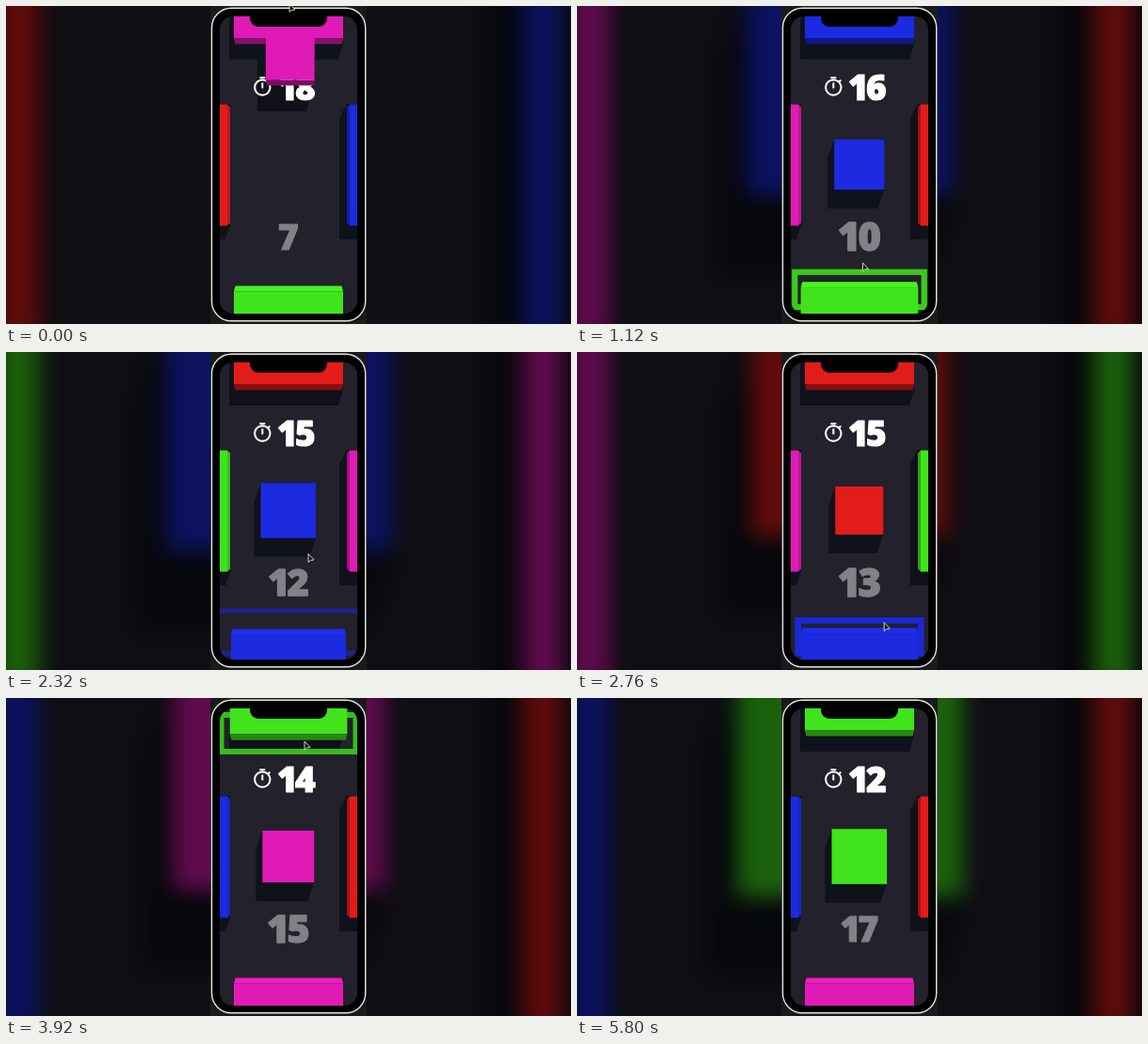
Animation, 600 px wide and 338 px high, one loop 6000 ms. Source, as an HTML page with a canvas:

```html
<!DOCTYPE html>
<html lang="en">
<head>
<meta charset="utf-8">
<title>Colour swipe game</title>
<style>
  html, body { margin: 0; width: 100%; height: 100%; overflow: hidden; background: #0b0b10; }
  canvas { display: block; width: 100vw; height: 100vh; }
</style>
</head>
<body>
<canvas id="stage" width="600" height="338"></canvas>
<script>
const LOOP = 6000, STEP = 40, FLIGHT = 130, SWIPE = 220;
const stage = document.getElementById('stage').getContext('2d');
const layer = document.createElement('canvas');
layer.width = 600;
layer.height = 338;
const scene = layer.getContext('2d');

const COLORS = { M: [224, 26, 180], R: [226, 27, 27], B: [28, 42, 224], G: [64, 227, 28] };
const FONT = '900 semi-condensed 37px "Open Sans", "Noto Sans", sans-serif';

// Wall colours run clockwise from the top; a shuffle lasts until the next one.
const SHUFFLES = { 0: 'MBGR', 2: 'BRGM', 4: 'RMBG', 6: 'RGBM', 7: 'GRMB' };
const CUBES = 'MGGBBBRGMMG';
const FACE_LIGHT = [0.6, 0.72, 1.08, 0.86];

// Every cube strikes the wall of its own colour; the pace slows after the third hit.
let walls;
const hits = [...CUBES].map((cube, i) => {
  const turn = walls ? walls.indexOf(CUBES[i - 1]) : -1;
  walls = SHUFFLES[i] || walls;
  return { time: 900 + (i - 3) * (i < 3 ? 430 : 556), turn, walls, cube };
});

const clamp = v => Math.max(0, Math.min(1, v));
const mix = (a, b, p) => a + (b - a) * p;
const smooth = v => clamp(v) ** 2 * (3 - 2 * clamp(v));
const shade = (key, k = 1) => `rgb(${COLORS[key].map(v => Math.min(255, v * k)).join(',')})`;

function poly(ctx, fill, ...points) {
  ctx.beginPath();
  points.forEach(p => ctx.lineTo(...p));
  ctx.closePath();
  ctx.fillStyle = fill;
  ctx.fill();
}

function rounded(ctx, x, y, w, h, r) {
  ctx.beginPath();
  ctx.roundRect(x, y, w, h, r);
}

function shadow(x, y, w, h, dx, dy) {
  poly(scene, '#0f111b', [x, y], [x + dx, y + dy], [x + dx, y + h + dy],
    [x + w + dx, y + h + dy], [x + w, y + h], [x + w, y]);
}

// Local axes of a wall: x along the screen edge, y pointing into the screen.
function atEdge(turn, draw) {
  const angle = turn * Math.PI / 2;
  scene.save();
  scene.translate(300 + 73 * Math.sin(angle), 169 - 158 * Math.cos(angle));
  scene.rotate(angle);
  draw();
  scene.restore();
}

function drawWall(turn, color, bump) {
  const upright = turn % 2;
  const half = upright ? 64.5 : 58, depth = upright ? 8 : 23.5, face = upright ? 3 : 6;
  const inset = upright ? 3 : 1.5;
  atEdge(turn, () => {
    const k = 1 + 0.075 * bump;
    scene.translate(0, 27 * (1 - k) * -1 - 27 * 0 - 54 * (k - 1));
    scene.translate(0, 54 * (k - 1));
    scene.scale(k, k);
    poly(scene, shade(color), [-half, -30], [half, -30], [half, depth], [-half, depth]);
    poly(scene, shade(color, FACE_LIGHT[turn]), [-half, depth], [half, depth],
      [half - inset, depth + face], [inset - half, depth + face]);
  });
}

function drawRipple(turn, color, age) {
  const alpha = clamp(1 - (age - 200) / 260);
  if (turn < 0 || !alpha) return;
  const half = 58 + age ** 2 / 3500, front = 29.5 + 0.081 * age, thick = Math.max(3, 9 - age / 80);
  atEdge(turn, () => {
    scene.globalAlpha = alpha;
    scene.strokeStyle = shade(color, 0.95);
    scene.lineWidth = thick;
    scene.strokeRect(thick / 2 - half, 7, 2 * half - thick, front - 7 - thick / 2);
  });
}

function drawNumber(value, x, y, color, scale = 1) {
  scene.save();
  scene.translate(x, y);
  scene.scale(scale, scale);
  scene.font = FONT;
  scene.textAlign = 'center';
  scene.fillStyle = scene.strokeStyle = color;
  scene.lineWidth = 1.2;
  scene.lineJoin = 'round';
  scene.letterSpacing = '-2.5px';
  scene.fillText(value, -1.2, 13.5);
  scene.strokeText(value, -1.2, 13.5);
  scene.restore();
}

function drawStopwatch(x, y) {
  scene.strokeStyle = '#fff';
  scene.lineWidth = 2;
  scene.beginPath();
  scene.arc(x, y, 8.2, 0, Math.PI * 2);
  scene.moveTo(x - 3, y - 10.3);
  scene.lineTo(x + 3, y - 10.3);
  scene.moveTo(x, y + 1);
  scene.lineTo(x, y - 5);
  scene.moveTo(x + 6, y - 6);
  scene.lineTo(x + 8, y - 8);
  scene.stroke();
}

// The cube grows in the centre, then flies towards the wall of the next hit.
function cubePose(age, next, t) {
  const p = next ? clamp((t - next.time + FLIGHT) / FLIGHT) : 0;
  const eased = 1 - (1 - p) ** 2;
  const grow = Math.min(1, age / 120, 0.61 + 0.00137 * age);
  const lift = next && next.turn === 2 ? -eased : eased;
  return { size: 58.6 * grow - 7.5 * eased, x: 299.8 + 2.2 * eased, y: 168.5 - 128 * lift, lift };
}

function drawCube({ size, x, y, lift }, color) {
  const half = size / 2, depth = 6.5 * lift;
  const edge = y + half * Math.sign(lift);
  poly(scene, shade(color, lift > 0 ? 0.55 : 1.08), [x - half, edge], [x + half, edge],
    [x + half - 1, edge + depth], [x - half + 1, edge + depth]);
  scene.fillStyle = shade(color);
  scene.fillRect(x - half, y - half, size, size);
}

function drawScene(t, now, next) {
  const age = t - now.time;
  const bump = clamp(Math.min(age / 60, (350 - age) / 60));
  const cube = cubePose(age, next, t);

  scene.clearRect(0, 0, 600, 338);
  scene.save();
  rounded(scene, 227, 11, 146, 316, 14);
  scene.clip();
  scene.fillStyle = '#23212b';
  scene.fillRect(227, 11, 146, 316);

  shadow(242, -20, 116, 60, -5, 17);
  shadow(210, 104, 28, 129, -5, 15);
  shadow(362, 104, 20, 129, -8, 15);
  shadow(cube.x - cube.size / 2, cube.y - cube.size / 2, cube.size, cube.size,
    -7 - 2 * Math.max(0, cube.lift), 20 + 15 * cube.lift);

  drawStopwatch(272.3, 86.6);
  drawNumber(18 - Math.floor((t + 940) / 1000), 308.3, 86, '#fff');
  drawNumber(7 + hits.indexOf(now), 299.8, 245, '#828187', 1 + 0.13 * Math.sin(Math.PI * clamp(age / 380)));

  drawRipple(now.turn, now.walls[now.turn], age);
  [...now.walls].forEach((color, turn) => drawWall(turn, color, turn === now.turn ? bump : 0));
  drawCube(cube, now.cube);
  scene.restore();
}

function drawBackdrop() {
  const zoom = 4.1;
  stage.fillStyle = '#08080c';
  stage.fillRect(0, 0, 600, 338);
  stage.save();
  stage.filter = 'blur(11px) brightness(0.43)';
  stage.drawImage(layer, 290.5 - 300 * zoom, 212 - 198 * zoom, 600 * zoom, 338 * zoom);
  stage.restore();
}

function drawPhone() {
  stage.fillStyle = '#1a1a1d';
  stage.fillRect(217, 0, 166, 338);
  rounded(stage, 218.5, 2.2, 163.2, 332.6, 21);
  stage.fillStyle = '#000';
  stage.fill();
  stage.strokeStyle = '#e4e4e4';
  stage.lineWidth = 1.4;
  stage.stroke();
  stage.drawImage(layer, 0, 0);
  rounded(stage, 259, 8, 82, 14, [0, 0, 9, 9]);
  stage.fillStyle = '#000';
  stage.fill();
}

// The pointer swipes past the struck wall, then drifts back to the middle.
function drawPointer(t, now, next) {
  const swipeEnd = hit => hit.turn === 0 ? -20 : 300;
  const rest = mix(swipeEnd(now), next ? 180 : 360, smooth((t - now.time - 140) / 260));
  const y = next ? mix(rest, swipeEnd(next), smooth((t - next.time + SWIPE) / SWIPE)) : rest;
  const x = 301 + 26 * Math.sin(Math.PI * t / LOOP) ** 4;
  poly(stage, '#111', [x, y], [x, y + 9], [x + 2.3, y + 7], [x + 6, y + 6.5]);
  stage.strokeStyle = '#d6d2c4';
  stage.lineWidth = 1;
  stage.stroke();
}

function frame(clock) {
  const t = Math.floor((clock % LOOP) / STEP) * STEP;
  const index = hits.findLastIndex(hit => hit.time <= t);
  const now = hits[index], next = hits[index + 1];
  drawScene(t, now, next);
  drawBackdrop();
  drawPhone();
  drawPointer(t, now, next);
  requestAnimationFrame(frame);
}
requestAnimationFrame(frame);
</script>
</body>
</html>
```
